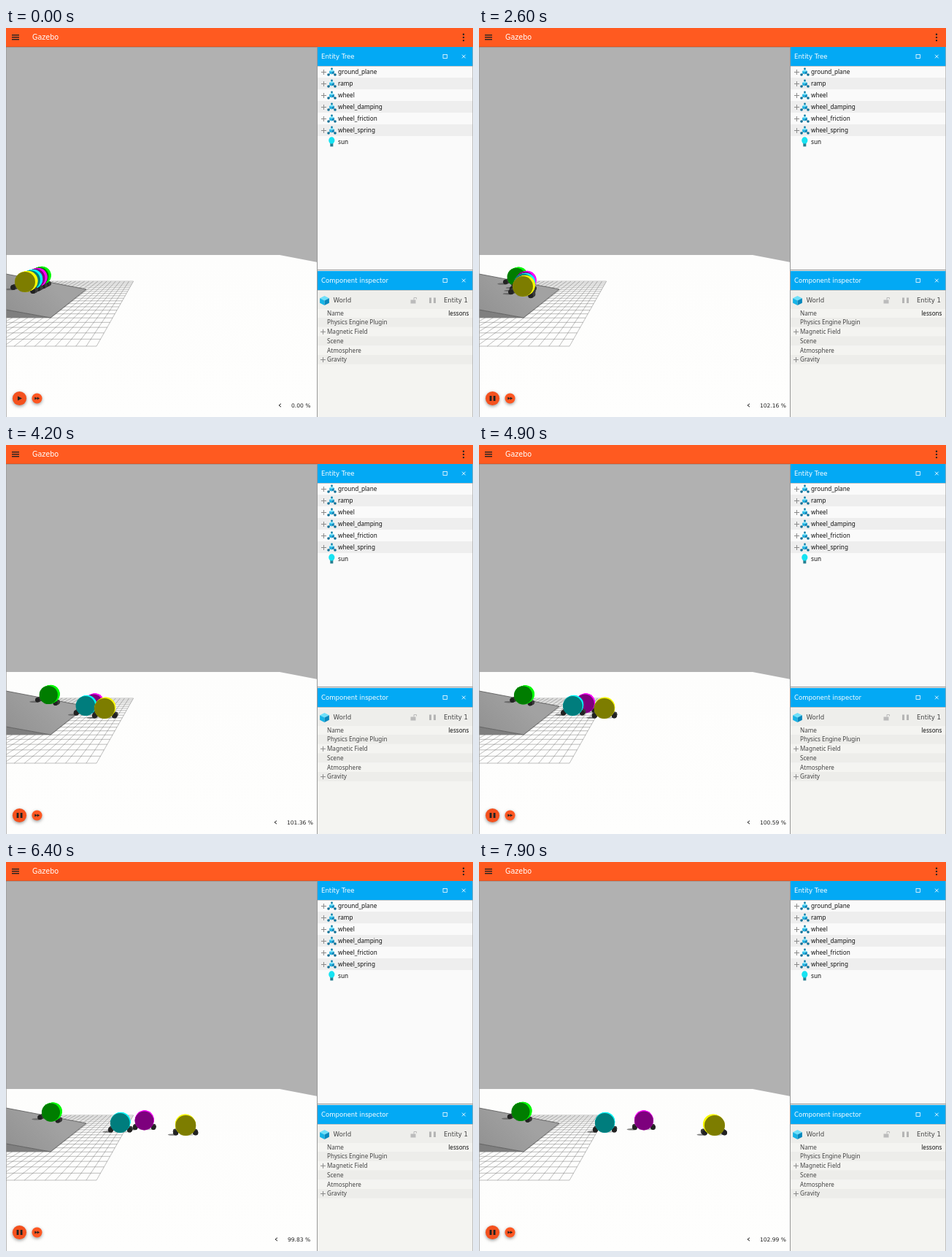
Recreate the animation shown at these times as an HTML page with a canvas. Size 640x533 px, loop 8 s.

```html
<!DOCTYPE html>
<html lang="en">
<head>
<meta charset="utf-8">
<title>Wheels on a ramp</title>
<style>
  html, body { margin: 0; width: 100%; height: 100%; overflow: hidden; background: #fafafa; }
  canvas { display: block; }
</style>
</head>
<body>
<canvas id="stage" width="640" height="533"></canvas>
<script>
const ctx = document.getElementById('stage').getContext('2d');
const LOOP = 8000, START = 0.5;
const VANISH = { x: 213, y: 279.5 };
const SANS = '"DejaVu Sans", sans-serif', HUMANIST = '"Noto Sans", sans-serif';

// ---------- drawing helpers ----------
function rect(x, y, w, h, color) {
  ctx.fillStyle = color;
  ctx.fillRect(x, y, w, h);
}
function trace(points) {
  ctx.beginPath();
  points.forEach(([x, y]) => ctx.lineTo(x, y));
}
function poly(color, ...points) {
  trace(points);
  ctx.fillStyle = color;
  ctx.fill();
}
function line(color, width, ...points) {
  trace(points);
  ctx.strokeStyle = color;
  ctx.lineWidth = width;
  ctx.stroke();
}
function ellipse(x, y, rx, ry, color) {
  ctx.beginPath();
  ctx.ellipse(x, y, rx, ry, 0, 0, 7);
  ctx.fillStyle = color;
  ctx.fill();
}
const disc = (x, y, r, color) => ellipse(x, y, r, r, color);
function text(str, x, y, size, color, family = SANS, align = 'left') {
  ctx.font = `${size}px ${family}`;
  ctx.textAlign = align;
  ctx.fillStyle = color;
  ctx.fillText(str, x, y);
}
function plus(x, y) {
  line('#8a8a8a', 1, [x - 3.5, y], [x + 3.5, y]);
  line('#8a8a8a', 1, [x, y - 3.5], [x, y + 3.5]);
}
function cube(x, y, s) {
  const h = s / 2;
  poly('#6fe0fa', [x, y - s], [x + s, y - h], [x, y], [x - s, y - h]);
  poly('#16b4e6', [x - s, y - h], [x, y], [x, y + s], [x - s, y + h]);
  poly('#0888bd', [x + s, y - h], [x, y], [x, y + s], [x + s, y + h]);
}

// ---------- motion ----------
const TIMES = [START, 1.7, 2.6, 4.2, 5.5, 6.4, 7.9];

// Smooth curve through the positions, starting at rest.
function along(xs, t) {
  if (t <= START) return xs[0];
  const last = xs.length - 1;
  const slope = i => (xs[i + 1] - xs[i]) / (TIMES[i + 1] - TIMES[i]);
  const tangent = i => {
    if (i === 0) return 0;
    if (i === last) return slope(last - 1);
    const before = TIMES[i] - TIMES[i - 1], after = TIMES[i + 1] - TIMES[i];
    return (slope(i - 1) * after + slope(i) * before) / (before + after);
  };
  let i = 0;
  while (i < last - 1 && t > TIMES[i + 1]) i++;
  const span = TIMES[i + 1] - TIMES[i], u = (t - TIMES[i]) / span, v = 1 - u;
  return xs[i] * v * v * (1 + 2 * u) + xs[i + 1] * u * u * (3 - 2 * u)
    + span * u * v * (tangent(i) * v - tangent(i + 1) * u);
}

const springX = t => 46 + 7.9 * (1 - Math.cos(Math.PI * Math.max(0, t - START) / 5.4));

// Ordered from far to near.
const WHEELS = [
  { face: '#007d00', rim: '#00fa00', r: 12.6, top: 340.3, ground: 360, x: springX },
  { face: '#7d007d', rim: '#fa00fa', r: 12.9, top: 342.7, ground: 354.5,
    x: t => along([40.5, 46.5, 63, 120, 165, 189.5, 226], t) },
  { face: '#007d7d', rim: '#00fafa', r: 13.4, top: 345.3, ground: 357.5,
    x: t => along([33.5, 42, 61, 109, 142.5, 156.3, 172.3], t) },
  { face: '#7d7d00', rim: '#fafa00', r: 14, top: 348, ground: 361,
    x: t => along([26, 36.3, 60, 135, 203, 246.3, 323], t) },
];

const RATES = [[1.4, 94.1], [1.7, 94.87], [2.1, 101.27], [2.6, 102.16], [4.2, 101.36], [5, 100.48],
  [5.5, 84.69], [6.4, 99.83], [6.7, 101.12], [7.9, 102.99]];

function rate(t) {
  if (t < START) return 0;
  if (t < 1.4) return (t - START) * 9.7;
  const i = Math.max(1, RATES.findIndex(([time]) => time >= t));
  const [t0, a] = RATES[i - 1], [t1, b] = RATES[i];
  return a + (b - a) * (t - t0) / (t1 - t0);
}

// ---------- 3D view ----------
function drawGrid() {
  const near = 436 - VANISH.y, far = 347 - VANISH.y, cells = 20;
  const depthStep = (1 / far - 1 / near) / cells;
  const cellWidth = 14.1, rightEdge = 124 - VANISH.x;
  const at = (column, drop) =>
    [VANISH.x + (rightEdge - column * cellWidth) * drop / near, VANISH.y + drop];
  for (let i = 0; i <= cells; i++) {
    const drop = 1 / (1 / near + i * depthStep);
    line('rgba(70,70,70,.5)', 0.7, at(0, drop), at(cells, drop));
    line('rgba(70,70,70,.5)', 0.7, at(i, near), at(i, far));
  }
}

function drawRamp() {
  poly('#7f7f7f', [0, 386], [61, 397], [0, 397]);
  const shade = ctx.createLinearGradient(0, 390, 50, 340);
  shade.addColorStop(0, '#929292');
  shade.addColorStop(1, '#a2a2a2');
  poly(shade, [0, 337], [110, 358], [61, 397], [0, 386]);
  line('#555', 0.8, [0, 337], [110, 358], [61, 397], [0, 386]);
}

// A short cylinder whose axle points into the view.
function cylinder(x, y, r, depth, face, side) {
  for (let i = 8; i > 0; i--) {
    const k = depth * i / 8;
    disc(x + (VANISH.x - x) * k, y + (VANISH.y - y) * k, r * (1 - k), side);
  }
  disc(x, y, r, face);
}

function drawWheel(wheel, t) {
  const x = wheel.x(t), r = wheel.r;
  const slopeY = wheel.top + 0.18 * (x - wheel.x(0));
  const y = Math.min(wheel.ground, slopeY);
  const tilt = Math.min(1, Math.max(0, (wheel.ground - slopeY) / 3)) * 0.18;
  const caster = side => [x + side * r * 0.97 - tilt * 16, y + r * 0.72 + side * tilt * r];

  const [sx, sy] = caster(-1);
  ellipse(sx - 4, sy + 2.5, 7, 1.2, 'rgba(90,90,90,.75)');
  ellipse(x + 2, y + r * 0.9, r * 0.7, 1.2, 'rgba(90,90,90,.4)');
  for (const side of [-1, 1]) cylinder(...caster(side), r * 0.25, 0.023, '#222', '#3c3c3c');
  cylinder(x, y, r, 0.021, wheel.face, wheel.rim);
}

function drawScene(t) {
  rect(0, 26, 427, 507, '#b1b1b1');
  const floor = ctx.createLinearGradient(0, 311, 0, 533);
  floor.addColorStop(0, '#fdfdfc');
  floor.addColorStop(1, '#fefefd');
  poly(floor, [0, 311], [375, 311], [427, 321], [427, 533], [0, 533]);
  drawGrid();
  drawRamp();
  WHEELS.forEach(wheel => drawWheel(wheel, t));
  rect(0, 26, 0.7, 507, '#999');
}

// ---------- interface ----------
function button(x, r, color) {
  ctx.save();
  ctx.shadowColor = 'rgba(0,0,0,.4)';
  ctx.shadowBlur = 4;
  ctx.shadowOffsetY = 1.5;
  disc(x, 507.5, r, color);
  ctx.restore();
}
function arrow(x, w, h) {
  poly('#222', [x, 507.5 - h], [x + w, 507.5], [x, 507.5 + h]);
}

function drawControls(t) {
  button(18.5, 9.6, '#f4511e');
  if (t < START) {
    arrow(16, 6, 3);
  } else {
    rect(14.6, 504, 2.8, 7, '#222');
    rect(19.7, 504, 2.8, 7, '#222');
  }
  button(42.5, 7, '#ff5722');
  arrow(39.3, 3.5, 2);
  arrow(42.6, 3.5, 2);

  const value = rate(t);
  const left = value >= 100 ? 385 : value >= 10 ? 386 : 391;
  line('#222', 1, [left - 14, 514.8], [left - 17, 517], [left - 14, 519.2]);
  text(value.toFixed(2) + ' %', left, 519.7, 7.55, '#222');
}

function drawHeader() {
  rect(0, 0, 640, 26, '#ff5a20');
  rect(0, 25.5, 427, 1, 'rgba(90,60,50,.35)');
  for (const y of [9, 12, 15]) rect(8, y, 10, 1.4, '#222');
  for (const y of [8.7, 12.9, 17.1]) disc(627, y, 1.2, '#222');
  text('Gazebo', 36, 16.2, 9.6, '#fff');
}

function panelTitle(title, y) {
  rect(427, y, 213, 26, '#03a9f4');
  rect(427, y + 26, 213, 1, 'rgba(0,0,0,.2)');
  text(title, 432, y + 16.2, 8.56, '#fff');
  const cy = y + 13;
  ctx.strokeStyle = '#fff';
  ctx.lineWidth = 0.8;
  ctx.strokeRect(599, cy - 2.5, 5.5, 5);
  line('#fff', 0.9, [625, cy - 2.3], [629.6, cy + 2.3]);
  line('#fff', 0.9, [625, cy + 2.3], [629.6, cy - 2.3]);
}

function modelIcon(x, y) {
  line('#555', 0.8, [x - 4, y + 4], [x, y], [x + 4, y + 4]);
  line('#555', 0.8, [x, y - 4.5], [x, y]);
  disc(x, y - 4, 1.4, '#0d7fa8');
  cube(x, y + 0.3, 3.3);
  disc(x - 4.5, y + 4, 1.8, '#0d6f96');
  disc(x + 4.5, y + 4, 1.8, '#0d6f96');
}

function drawTree() {
  rect(427, 52, 213, 280, '#fafafa');
  const names = ['ground_plane', 'ramp', 'wheel', 'wheel_damping', 'wheel_friction', 'wheel_spring', 'sun'];
  names.forEach((name, i) => {
    const y = 60 + 16 * i;
    if (i % 2) rect(427, y - 8, 213, 16, '#eee');
    if (name === 'sun') {
      rect(444.3, y + 1, 4, 5.4, '#267f91');
      ellipse(446.3, y - 2, 4.1, 4.7, '#16e3f2');
    } else {
      plus(435.5, y + 0.5);
      modelIcon(446.5, y);
    }
    text(name, 455, y + 3, 8.18, '#111', HUMANIST);
  });
  panelTitle('Entity Tree', 26);
  rect(427, 331, 213, 1.3, '#999');
}

function drawInspector() {
  rect(427, 332.3, 213, 201, '#f4f4f1');
  rect(427, 361, 213, 24, '#eeeeeb');
  panelTitle('Component inspector', 333);
  cube(436.5, 373.5, 6.4);
  text('World', 448.5, 376.2, 8.6, '#444');
  text('Entity 1', 633, 376.2, 8.56, '#444', SANS, 'right');

  rect(554.5, 372.5, 7, 5, '#bbb');
  line('#bbb', 1, [559, 372.5], [559, 369.5], [562.5, 369.5], [562.5, 371.5]);
  rect(580, 369.5, 3, 7.5, '#b5b5b5');
  rect(586, 369.5, 3, 7.5, '#b5b5b5');

  const labels = ['Name', 'Physics Engine Plugin', 'Magnetic Field', 'Scene', 'Atmosphere', 'Gravity'];
  labels.forEach((label, i) => {
    const y = 390.5 + 12.75 * i;
    if (i % 2) rect(427, y - 6.4, 213, 12.75, '#ededea');
    if (label === 'Magnetic Field' || label === 'Gravity') plus(434.5, y + 0.3);
    text(label, 440, y + 3, 8.13, '#444', HUMANIST);
  });
  text('lessons', 634.5, 393.5, 8.13, '#111', HUMANIST, 'right');
}

function render(now) {
  const t = Math.floor(now % LOOP / 100) / 10;
  drawScene(t);
  drawControls(t);
  drawHeader();
  drawTree();
  drawInspector();
  rect(426, 26, 1, 507, '#999');
  rect(639.3, 26, 0.7, 507, '#aaa');
}

const begin = performance.now();
function tick() {
  render(performance.now() - begin);
  requestAnimationFrame(tick);
}
tick();
</script>
</body>
</html>
```
